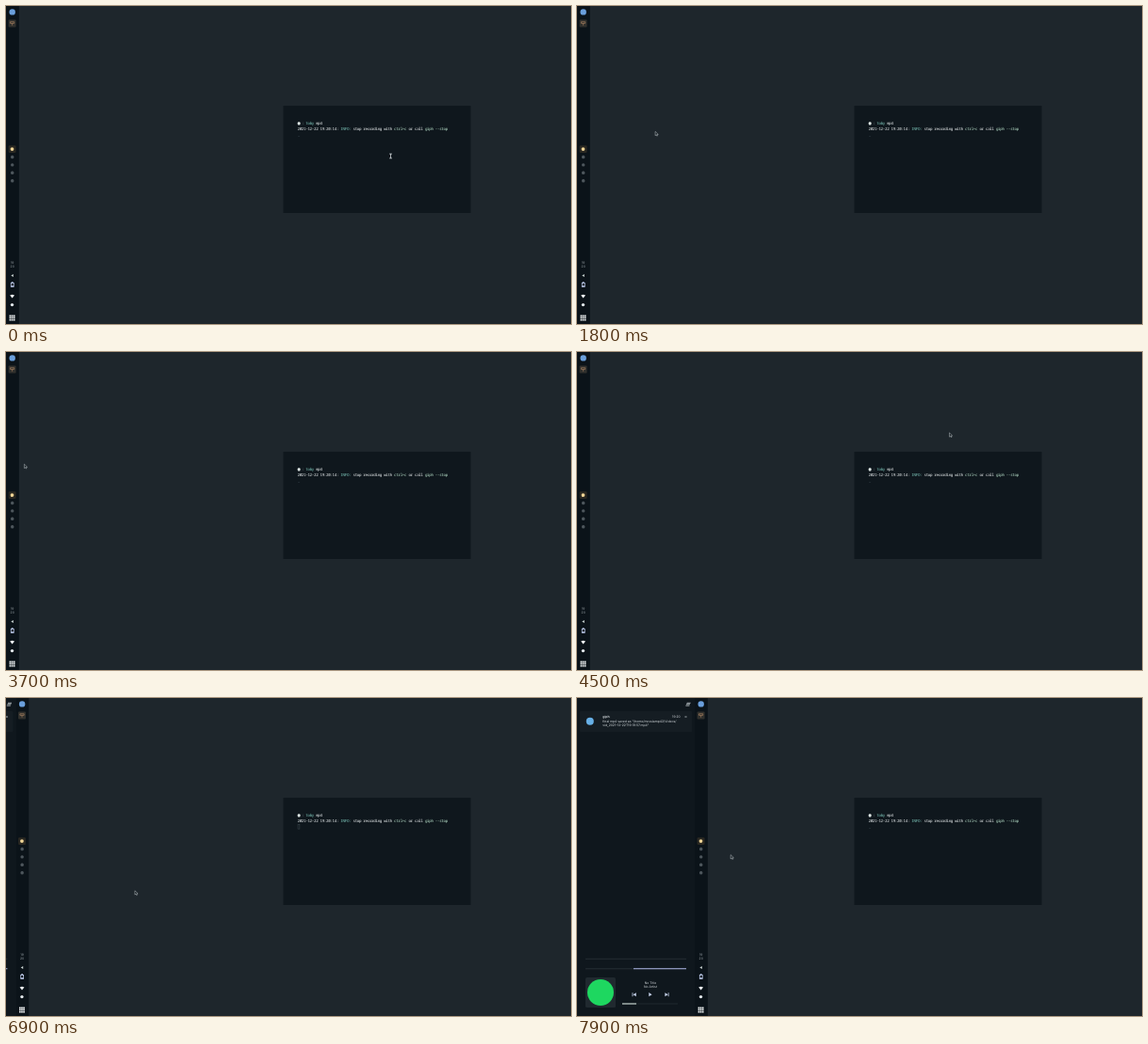
These frames come from a looping animation (600x338 px, 8 s). An HTML page:

```html
<!DOCTYPE html>
<html lang="en">
<head>
<meta charset="utf-8">
<title>Desktop with sliding panel</title>
<style>
  html, body { margin: 0; width: 100%; height: 100%; overflow: hidden; background: #1e262c; }
  svg { display: block; width: 600px; height: 338px; }
  text { text-rendering: geometricPrecision; white-space: pre; }
  .mono { font: 4.2px "Noto Sans Mono", "DejaVu Sans Mono", monospace; letter-spacing: -.33px; fill: #eef2f3; }
  .ui { font: 3.4px Inter, Roboto, sans-serif; fill: #d6dcdf; }
  .bold { font-weight: 700; }
  .teal { fill: #7cc4b8; }
  .mint { fill: #b9e2cb; }
  .dim { fill: #9aa4a9; }
  .mid { text-anchor: middle; }
</style>
</head>
<body>
<svg viewBox="0 0 600 338" xmlns="http://www.w3.org/2000/svg">
  <rect width="600" height="338" fill="#1e262c"/>

  <g id="terminal">
    <rect x="294.5" y="106" width="199" height="114" fill="#0f171d"/>
    <rect x="309.7" y="123.2" width="2.8" height="3.2" rx="1" fill="#dfe8e6"/>
    <text class="mono" x="313.9" y="126.2"><tspan class="dim">: </tspan><tspan class="teal">toby</tspan> mp4</text>
    <text class="mono" x="309.5" y="132.2">2021-12-22 19:20:14: <tspan class="teal">INFO:</tspan> stop recording with <tspan class="mint">ctrl+c</tspan> or call <tspan class="mint">giph --stop</tspan></text>
    <rect id="line" x="310" y="138.2" width="2" height=".6" fill="#2b353b"/>
    <rect id="block" x="310" y="134.5" width="1.9" height="4.6" fill="none" stroke="#3f4a50" stroke-width=".5"/>
  </g>

  <g id="slider">
    <!-- panel, parked to the left of the bar -->
    <g transform="translate(-125)">
      <rect width="125.2" height="338" fill="#0f171d"/>
      <path d="M116.6 5.3h4M116 6.7h4M115.4 8.1h4" stroke="#c8d0d4" stroke-width=".8"/>
      <rect x="3" y="14" width="119" height="22" rx="1.2" fill="#151d23"/>
      <circle cx="13.8" cy="24.8" r="4" fill="#67b0e6"/>
      <text class="ui bold" x="27.3" y="21.4">giph</text>
      <text class="ui" x="101" y="21.4">19:20</text>
      <path d="M114.5 19l2 2m0-2l-2 2" stroke="#b5bdc1" stroke-width=".5"/>
      <text class="ui" x="27.3" y="26">final mp4 saved as "/home/mosslamp42/Videos/</text>
      <text class="ui" x="27.3" y="30.3">vid_2021-12-22T19:19:57.mp4"</text>
      <path d="M9 277.3H116M9 287.8H60" stroke="#252e34"/>
      <path d="M60 287.8H116" stroke="#b3bdec" stroke-width="1.1"/>
      <rect x="9" y="297" width="32" height="32" rx="1.5" fill="#20292f"/>
      <circle cx="25" cy="313" r="14" fill="#1ed760"/>
      <text class="ui mid" x="78" y="303.9">No Title</text>
      <text class="ui mid" x="78" y="308">No Artist</text>
      <g fill="#c6d2ea">
        <path d="M58.6 313.2h.8v4h-.8zM62.8 313.2v4l-3.2-2z"/>
        <path d="M76.3 313.1v4.2l3.3-2.1z"/>
        <path d="M96.7 313.2h.8v4h-.8zM93.4 313.2v4l3.2-2z"/>
      </g>
      <path d="M63 325H107" stroke="#252e34" stroke-width=".8"/>
      <path d="M48 325H63" stroke="#d8e8e0" stroke-width="1.1"/>
    </g>

    <!-- bar -->
    <rect width="13.8" height="338" fill="#0b1319"/>
    <circle cx="6.7" cy="6.4" r="3.2" fill="#6a9fdc"/>
    <rect x="2.6" y="14.4" width="8" height="8" rx="1" fill="#30302d"/>
    <path d="M4.5 16.8h4.2v1.6h-4.2zM6.6 18.4v2.2" fill="none" stroke="#a5805f" stroke-width=".7"/>
    <rect x="2.7" y="148.2" width="7.8" height="7.8" rx="1" fill="#2a2822"/>
    <circle cx="6.5" cy="152.1" r="1.9" fill="#f0d596"/>
    <g id="tags" fill="#4d565c"></g>
    <text class="ui mid dim" x="6.7" y="274.2">19</text>
    <text class="ui mid dim" x="6.7" y="278.4">20</text>
    <path d="M5.3 286.5l2.5-1.4v2.8z" fill="#cbd6d4"/>
    <rect x="5.3" y="294.5" width="2.9" height="4" fill="none" stroke="#c0cdee" stroke-width=".8"/>
    <path d="M5.8 293.7h1.8M5.4 297.8h2.6" stroke="#c0cdee"/>
    <path d="M4.2 307.6q2.4-1.8 4.8 0l-2.4 3z" fill="#eef2f4"/>
    <circle cx="6.5" cy="317.6" r="1.7" fill="#e3e9ec"/>
    <g id="grid" fill="#f2f5f6"></g>
  </g>

  <g id="arrow">
    <path d="M.4.4V4.7L1.4 3.8 2.1 5.2 2.8 4.9 2.2 3.5H3.6z" fill="#10171c" stroke="#c3cace" stroke-width=".5"/>
  </g>
  <path id="beam" d="M-1.4-2.3h2.8M-1.4 2.3h2.8M0-2.3v4.6" fill="none" stroke="#d5dbde" stroke-width=".8"/>
</svg>
<script>
const LOOP = 8000, TICK = 100;
const $ = id => document.getElementById(id);

const square = (x, y, size, round) =>
  `<rect x="${x}" y="${y}" width="${size}" height="${size}" rx="${round}"/>`;
const repeat = (count, make) => Array.from({ length: count }, (_, i) => make(i)).join("");
$("tags").innerHTML = repeat(4, i => square(5, 158.8 + i * 8.4, 3.4, 1.5));
$("grid").innerHTML = repeat(9, i =>
  square(3.6 + i % 3 * 2.1, 328.5 + Math.floor(i / 3) * 2.1, 1.7, .2));

// Pointer strokes: Bezier curves, each leaving from where the last one ended.
const strokes = [];
let rest = [408.5, 159.5];
function stroke(from, to, ...points) {
  strokes.push({ from, to, points: [rest, ...points] });
  rest = points[points.length - 1];
}
stroke(0, 0, rest);
stroke(400, 1100, [360, 65], [285, 255], [251.3, 165.3]);
stroke(1300, 1600, [200, 171], [144.5, 166]);
stroke(1700, 1800, [82.7, 133]);
stroke(1800, 2600, [40, 55], [6, 270], [7, 149.5]);
stroke(3600, 3700, [19, 118.8]);
stroke(3700, 3900, [64.6, -4], [107.7, 187.7]);
stroke(4100, 4700, [585, 560], [585, -110], [3.6, 10]);
stroke(5300, 5400, [17.5, 30.7]);
stroke(5400, 5700, [66.7, 97.3]);
stroke(5800, 6100, [-7.7, 144], [136.5, 204.4]);
stroke(7200, 7600, [170, 228], [217.6, 227.6]);
stroke(7600, 7900, [185, 114], [162.8, 166.3]);

const mix = (a, b, u) => a.map((v, i) => v + (b[i] - v) * u);
const clamp = v => Math.min(Math.max(v, 0), 1);

function bezier(points, u) {
  if (points.length === 1) return points[0];
  return bezier(points.slice(1).map((p, i) => mix(points[i], p, u)), u);
}

function pointerAt(t) {
  const { from, to, points } = strokes.filter(s => s.from <= t).pop();
  return bezier(points, clamp((t - from) / (to - from || 1)));
}

// Panel width times a smooth ease with gentle ends.
function slideAt(t) {
  const u = clamp((t - 6815) / 370);
  return 125 * u ** 3 * (10 - 15 * u + 6 * u * u);
}

const inTerminal = (x, y) => x > 294.5 && x < 493.5 && y > 106 && y < 220;
const move = (el, x, y) => el.setAttribute("transform", `translate(${x} ${y})`);
const show = (el, on) => el.style.display = on ? "" : "none";

function draw(now) {
  const t = Math.floor(now % LOOP / TICK) * TICK;
  const [x, y] = pointerAt(t);
  const typing = inTerminal(x, y);
  move($("arrow"), x, y);
  move($("beam"), x, y);
  show($("arrow"), !typing);
  show($("beam"), typing);
  move($("slider"), slideAt(t), 0);
  const unfocused = t >= 6800 && t < 7000;
  show($("block"), unfocused);
  show($("line"), !unfocused);
}

const begin = performance.now();
function frame() {
  draw(performance.now() - begin);
  requestAnimationFrame(frame);
}
frame();
</script>
</body>
</html>
```
